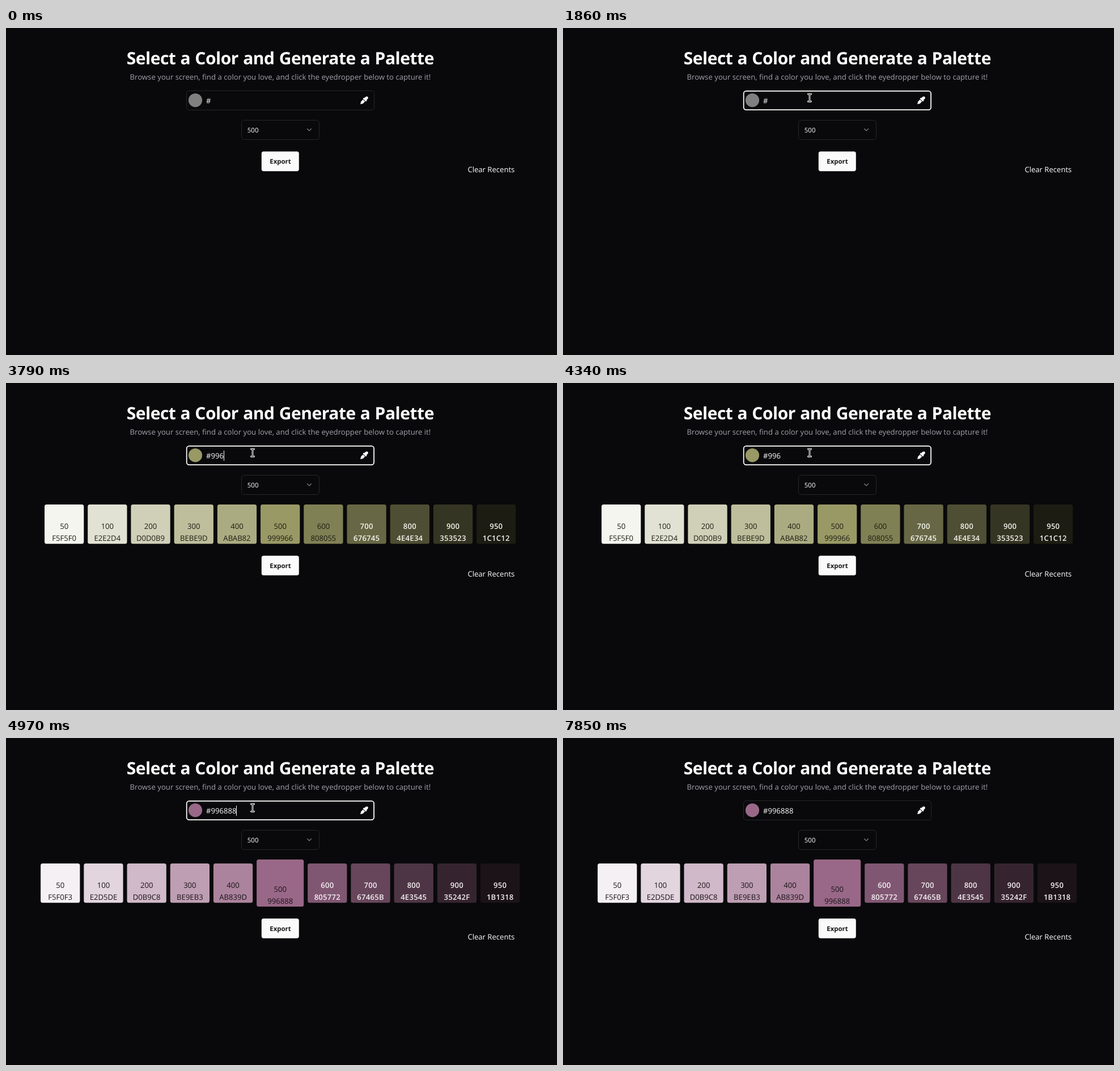
An HTML page that plays this animation: 972 by 576 pixels, repeating every 7.92 s.

```html
<!DOCTYPE html>
<html lang="en">
<head>
<meta charset="utf-8">
<title>Palette generator</title>
<style>
  html, body { margin: 0; width: 100%; height: 100%; overflow: hidden; background: #09090b; }
  svg { display: block; width: 972px; height: 576px; }
  text {
    font: 500 13.1px "Open Sans", "Noto Sans", sans-serif;
    fill: #fff;
    text-rendering: geometricPrecision;
    white-space: pre;
  }
  .mid { text-anchor: middle; }
  .title { font-size: 30px; font-weight: 700; letter-spacing: -.47px; word-spacing: .8px; }
  .sub { font-size: 13.2px; font-weight: 400; fill: #a1a1aa; }
  .small { font-size: 11.45px; }
  .button { font-weight: 700; fill: #18181b; }
  .strong { font-weight: 600; letter-spacing: .25px; }
  .box { fill: none; stroke: #27272a; }
  .line { fill: none; stroke-linecap: round; stroke-linejoin: round; }
</style>
</head>
<body>
<svg viewBox="0 0 972 576">
  <defs>
    <path id="beamShape" d="M-2.6-6.5H-1L0-5.8L1-6.5H2.6M0-5.8V5.8M-2.6 6.5H-1L0 5.8L1 6.5H2.6"/>
  </defs>
  <rect width="972" height="576" fill="#09090b"/>
  <text class="mid title" x="483.8" y="64">Select a Color and Generate a Palette</text>
  <text class="mid sub" x="483.9" y="91">Browse your screen, find a color you love, and click the eyedropper below to capture it!</text>

  <rect class="box" x="318.5" y="110.5" width="331" height="34" rx="4.7"/>
  <rect id="ring" x="318.7" y="111" width="330.4" height="33.1" rx="4.3" fill="none" stroke="#fff" stroke-width="1.75"/>
  <circle id="dot" cx="334" cy="127.3" r="12.1"/>
  <text id="value" x="353" y="133"></text>
  <rect id="caret" y="119" width="1" height="18" fill="#fafafa"/>
  <path transform="translate(625 120.4) scale(.0271)" fill="#fff" d="M50.75 333.25c-12 12-18.75 28.28-18.75 45.26V424L0 480l32 32 56-32h45.49c16.97 0 33.25-6.74 45.25-18.74l126.64-126.62-128-128zM483.88 28.12c-37.47-37.5-98.28-37.5-135.75 0l-77.09 77.09-13.1-13.1c-9.44-9.44-24.65-9.31-33.94 0l-40.97 40.96c-9.37 9.37-9.37 24.57 0 33.94l161.94 161.94c9.44 9.44 24.65 9.31 33.94 0L419.88 288c9.37-9.37 9.37-24.57 0-33.94l-13.1-13.1 77.09-77.09c37.51-37.48 37.51-98.26.01-135.75z"/>

  <rect class="box" x="415.5" y="162.5" width="137" height="34" rx="4.7"/>
  <text class="small" x="425.8" y="184">500</text>
  <path class="line" d="M531.5 177.5l3.5 3.5 3.5-3.5" stroke="#818183" stroke-width="1.15"/>

  <g id="swatches"></g>

  <g id="footer">
    <rect x="450.8" y="217.6" width="66" height="34.6" rx="3.6" fill="#fafafa"/>
    <text class="mid small button" x="484" y="239.4">Export</text>
    <text x="897.3" y="254" text-anchor="end">Clear Recents</text>
  </g>

  <path id="arrow" d="M0 0V14.5L3.4 11.3L5.6 16.4L7.8 15.5L5.6 10.5H10.3Z" fill="#fff" stroke="#000" stroke-width=".9"/>
  <g id="beam" class="line">
    <use href="#beamShape" stroke="#fff" stroke-width="2.8"/>
    <use href="#beamShape" stroke="#09090b" stroke-width=".9"/>
  </g>
</svg>
<script>
const LOOP = 7920;
const CENTER = 483.7, TOP = 214, SIZE = 69.28, BIG = 83.1, GAP = 6.93;
const OLIVE = "F5F5F0 E2E2D4 D0D0B9 BEBE9D ABAB82 999966 808055 676745 4E4E34 353523 1C1C12".split(" ");
const MAUVE = "F5F0F3 E2D5DE D0B9C8 BE9EB3 AB839D 996888 805772 67465B 4E3545 35242F 1B1318".split(" ");

// light: index of the first swatch with light text
const palettes = {
  none: { colors: [], dot: "#808080", drop: 0 },
  olive: { colors: OLIVE, dot: "#999966", light: 7, drop: 86.6 },
  faded: { colors: OLIVE.map(c => c + "87"), dot: "#99996687", light: 7, drop: 86.6 },
  mauve: { colors: MAUVE, dot: "#996888", light: 6, big: 5, drop: 100.5 }
};
const typing = [
  [0, "#", "none"], [3090, "#9", "none"], [3400, "#99", "none"], [3790, "#996", "olive"],
  [4420, "#9968", "faded"], [4660, "#99688", "faded"], [4970, "#996888", "mauve"]
];
// the caret is visible within these spans
const caretOn = [[1310, 1860], [2400, 2940], [3090, 4340], [4420, 5520], [6060, 6600], [7070, 7620]];
const REST = [435, 123];

const $ = id => document.getElementById(id);
const show = (el, on) => el.setAttribute("visibility", on ? "visible" : "hidden");
const mix = (a, b, k) => a + (b - a) * k;

function add(tag, attrs, text = "") {
  const el = document.createElementNS("http://www.w3.org/2000/svg", tag);
  for (const key in attrs) el.setAttribute(key, attrs[key]);
  el.textContent = text;
  $("swatches").append(el);
}

function drawPalette({ colors, dot, light, big, drop }) {
  $("swatches").replaceChildren();
  $("dot").setAttribute("fill", dot);
  $("footer").setAttribute("transform", `translate(0 ${drop})`);
  const extra = big ? BIG - SIZE : 0;
  let x = CENTER - (11 * SIZE + 10 * GAP + extra) / 2;
  colors.forEach((color, i) => {
    const size = i === big ? BIG : SIZE;
    const y = TOP + (SIZE + extra - size) / 2;
    const label = {
      x: x + size / 2,
      class: i < light ? "mid" : "mid strong",
      style: `fill:#${colors[i < light ? 10 : 0]}`
    };
    add("rect", { x, y, width: size, height: size, rx: 3.5, fill: "#" + color });
    add("text", { ...label, y: y + size - 26 }, i === 0 ? "50" : i === 10 ? "950" : String(i * 100));
    add("text", { ...label, y: y + size - 5.2 }, color);
    x += size + GAP;
  });
}

function cursorAt(t) {
  if (t < 210 || t >= 6760) return null;
  if (t < 770) {
    const p = Math.floor((t - 210) / 80) / 6;
    const e = 1 - (1 - p) ** 2;
    return [mix(584, 420, e), mix(562, 121, e)];
  }
  if (t < 6290) return REST;
  const p = (Math.floor((t - 6290) / 78.4) + 1) / 6;
  const e = Math.min(1, p) ** 1.6;
  return [mix(REST[0], 511, e), mix(REST[1], 562, e)];
}

function drawCursor(t) {
  const pos = cursorAt(t);
  const inField = pos && pos[1] < 145;
  show($("beam"), inField);
  show($("arrow"), pos && !inField);
  if (pos) $(inField ? "beam" : "arrow").setAttribute("transform", `translate(${pos})`);
}

function ringOpacity(t) {
  if (t < 1310 || t >= 7850) return 0;
  return [.3, .65, .88][Math.floor((t - 1310) / 83.4)] ?? 1;
}

let palette;
function render(t) {
  const [, value, name] = typing.findLast(step => t >= step[0]);
  if (name !== palette) drawPalette(palettes[palette = name]);
  $("value").textContent = value;
  $("caret").setAttribute("x", Math.round(361.15 + 7.465 * (value.length - 1)));
  show($("caret"), caretOn.some(([from, to]) => t >= from && t < to));
  $("ring").setAttribute("opacity", ringOpacity(t));
  drawCursor(t);
}

const start = performance.now();
function tick() {
  render((performance.now() - start) % LOOP);
  requestAnimationFrame(tick);
}
tick();
</script>
</body>
</html>
```
